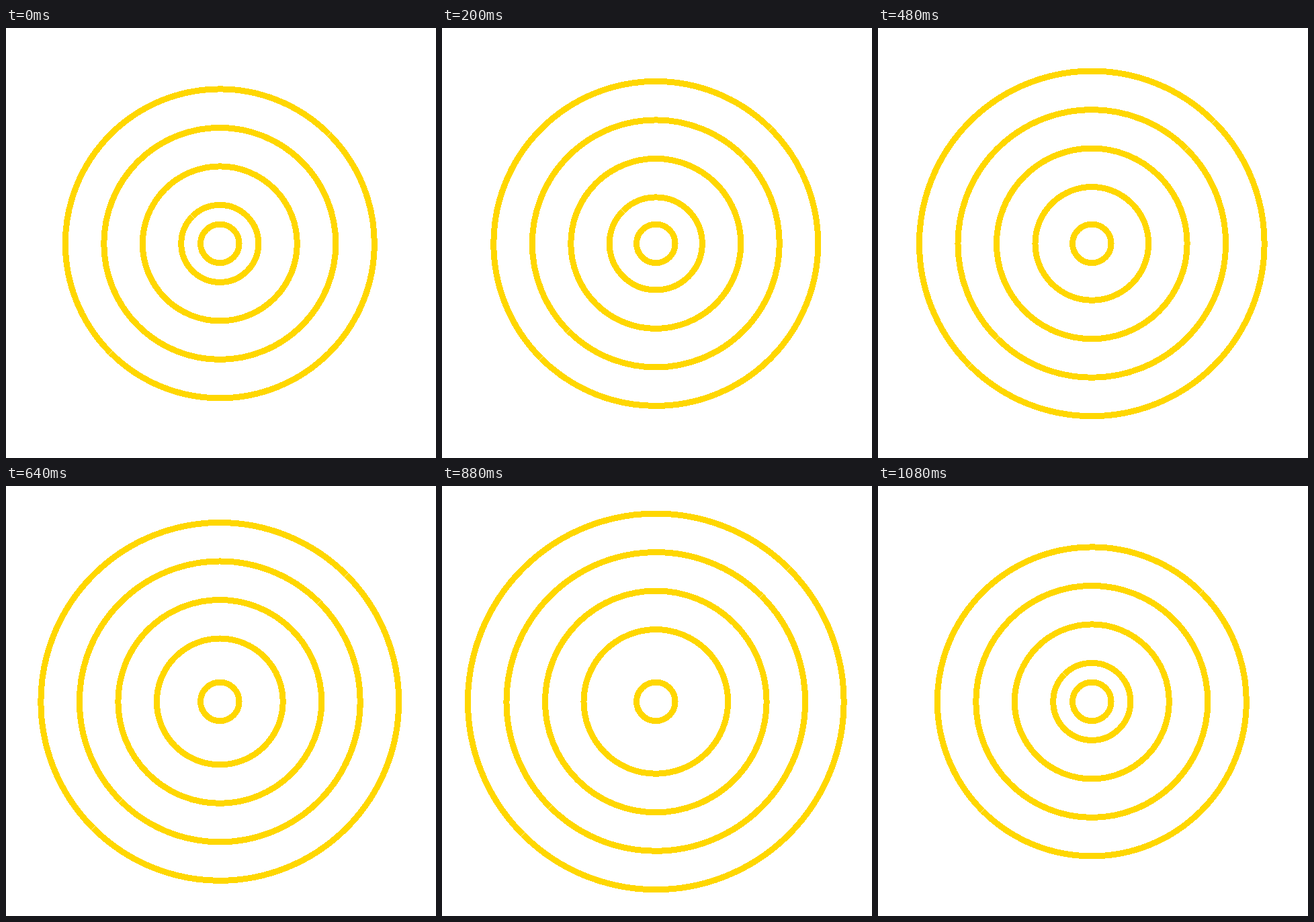
Animation, 640 px wide and 640 px high, one loop 1240 ms. Source, as an HTML page:

```html
<!DOCTYPE html>
<html lang="en">
<head>
<meta charset="utf-8">
<title>Expanding rings</title>
<style>
  html, body { margin: 0; width: 100%; height: 100%; overflow: hidden; background: #fff; }
  svg { display: block; width: 100%; height: 100%; }
</style>
</head>
<body>
<svg viewBox="0 0 640 640" fill="none" shape-rendering="crispEdges">
  <g transform="translate(318.3 320.9)">
    <g stroke="#ffd700" stroke-width="9">
      <circle r="28.75"/>
      <circle class="ring"/>
      <circle class="ring"/>
      <circle class="ring"/>
      <circle class="ring"/>
    </g>
    <path id="seams" stroke="#fff" stroke-width="0.6"/>
  </g>
</svg>
<script>
const LOOP = 1240, TICK = 40, MOVING = 27, POSES = 31, GAP = 57.5;
const rings = document.querySelectorAll('.ring');
const seams = document.getElementById('seams');

// Hairline across a ring on one diagonal
function seam(r, sx, sy) {
  const a = (r - 5) * Math.SQRT1_2, b = (r + 5) * Math.SQRT1_2;
  return `M${sx * a} ${sy * a}L${sx * b} ${sy * b}`;
}

function draw(now) {
  const tick = Math.floor(now % LOOP / TICK);
  const pose = tick < MOVING ? Math.floor(tick * POSES / MOVING + 0.75) : 0;
  let d = '';
  rings.forEach((ring, i) => {
    const r = GAP * (i + 1 + pose / 30);
    ring.setAttribute('r', r);
    if (r < 70) d += seam(r, -1, -1);
    if (r > 180) d += seam(r, 1, -1) + seam(r, -1, 1);
  });
  seams.setAttribute('d', d);
}

const start = performance.now();
function loop() {
  draw(performance.now() - start);
  requestAnimationFrame(loop);
}
loop();
</script>
</body>
</html>
```
